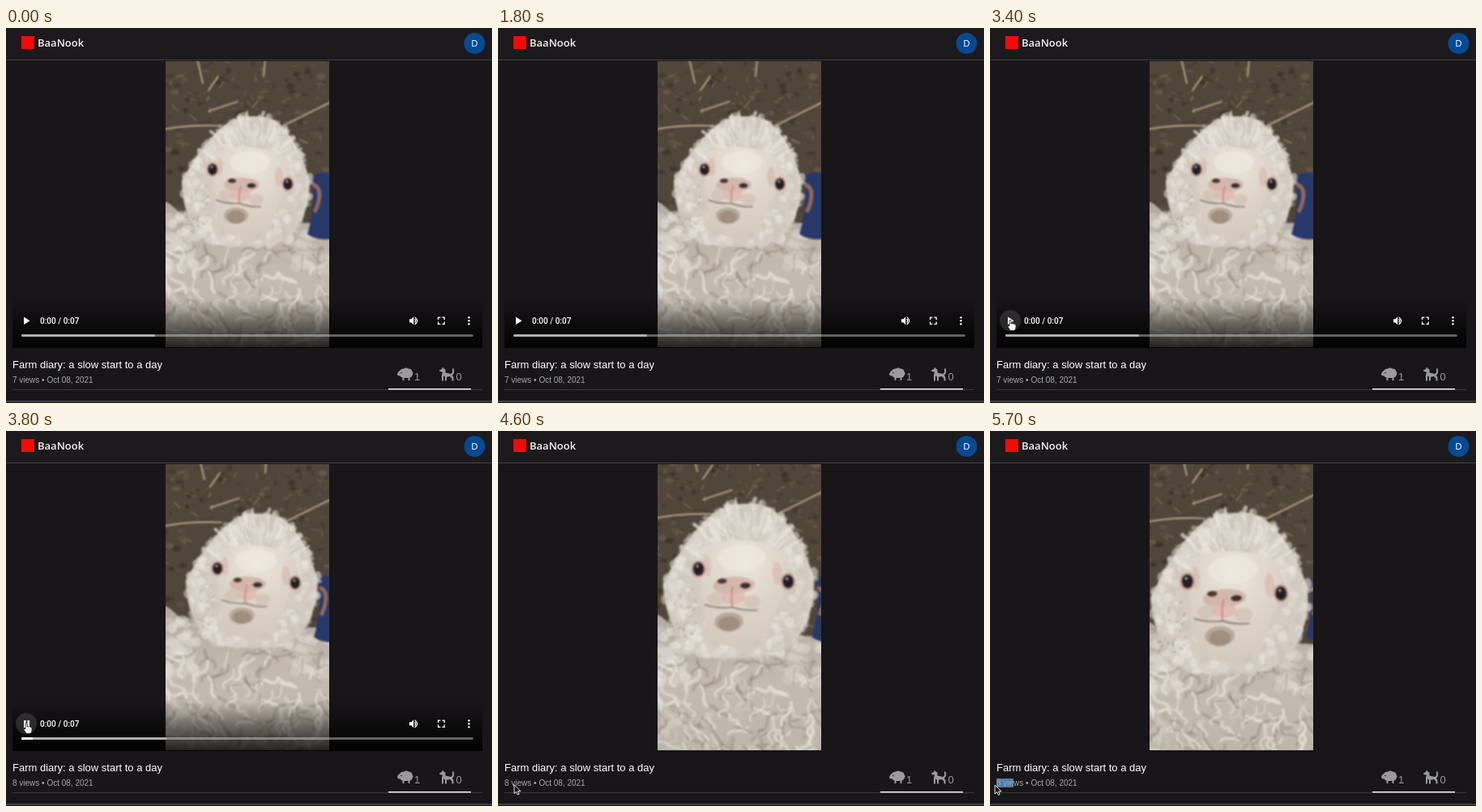
An HTML page for the animation above (5800 ms loop, 600x464 px).

```html
<!DOCTYPE html>
<html lang="en">
<head>
<meta charset="utf-8">
<title>Video page</title>
<style>
  html, body { margin: 0; width: 100%; height: 100%; overflow: hidden; background: #181618; }
  svg { display: block; width: 600px; height: 464px; font-family: "Liberation Sans", Arial, sans-serif; }
  .brand { font: 600 13px "Open Sans", Roboto, sans-serif; font-stretch: 75%; }
  .clock { font: 500 10px Roboto, sans-serif; }
  .soft { filter: blur(.8px); }
</style>
</head>
<body>
<svg viewBox="0 0 600 464">
  <defs>
    <clipPath id="screen"><rect x="197" y="41" width="202" height="354"/></clipPath>
    <linearGradient id="shade" x2="0" y2="1">
      <stop stop-opacity="0"/><stop offset=".45" stop-opacity=".4"/><stop offset="1" stop-opacity=".82"/>
    </linearGradient>
    <linearGradient id="fleece" x2="0" y2="1">
      <stop stop-color="#b3a99d"/><stop offset=".45" stop-color="#c4bbb0"/><stop offset="1" stop-color="#bcb3a8"/>
    </linearGradient>
    <radialGradient id="skin" cx=".5" cy=".2" r=".85">
      <stop stop-color="#ece6dd"/><stop offset=".6" stop-color="#dbd1c6"/><stop offset="1" stop-color="#d2c8bc"/>
    </radialGradient>
  </defs>

  <!-- page -->
  <rect width="600" height="39" fill="#1c1a1c"/>
  <rect y="39" width="600" height="1" fill="#434143"/>
  <rect x="19" y="10" width="16" height="16" fill="#f40a0a"/>
  <text class="brand" x="39" y="23" fill="#f2f2f2">BaaNook</text>
  <circle cx="578.5" cy="19" r="13" fill="#064a93"/>
  <text x="578.5" y="23" font-size="11" text-anchor="middle" fill="#fff">D</text>

  <!-- footage -->
  <g clip-path="url(#screen)">
    <rect x="197" y="41" width="202" height="354" fill="#50463a"/>
    <g id="ground" class="soft"></g>
    <g id="fleeceBody" class="soft"></g>
    <g id="strap" class="soft">
      <path d="M378 183Q390 176 403 181V261Q385 264 372 255Q382 225 378 183z" fill="#27386b"/>
      <path d="M379 194q8 2 8 12t-6 22" fill="none" stroke="#94695a" stroke-width="5"/>
    </g>
    <g id="head" class="soft"></g>
  </g>

  <!-- player controls -->
  <g id="panel" fill="#fff">
    <rect x="8" y="335" width="580" height="61" fill="url(#shade)"/>
    <circle id="hover" cx="25" cy="362" r="13" fill-opacity=".12"/>
    <path id="play" d="M22 357.5v9.5l7.5-4.75z"/>
    <path id="pause" d="M22 358h2.6v9H22zM26.4 358H29v9h-2.6z"/>
    <text class="clock" x="42" y="366">0:00 / 0:07</text>
    <path d="M498 360.3h2.2l3-3v10l-3-3H498z"/>
    <path d="M504.7 360q2 2.3 0 4.6M504.7 357.6q6 4.7 0 9.4" fill="none" stroke="#fff" stroke-width="1.2"/>
    <path d="M533.6 361v-2.8h2.8M538.4 358.2h2.8v2.8M541.2 363.6v2.8h-2.8M536.4 366.4h-2.8v-2.8" fill="none" stroke="#fff" stroke-width="1.3"/>
    <circle cx="571.5" cy="358.3" r="1.2"/><circle cx="571.5" cy="362.3" r="1.2"/><circle cx="571.5" cy="366.3" r="1.2"/>
    <rect x="19" y="379" width="558" height="3" rx="1.5" fill-opacity=".36"/>
    <rect id="buffered" x="19" y="379" height="3" rx="1.5" fill-opacity=".5"/>
    <rect id="played" x="19" y="379" height="3" rx="1.5"/>
    <circle id="knob" cx="23.5" cy="380.5" r="4.3" fill="#d4d4d4"/>
  </g>

  <!-- details -->
  <text x="8" y="421" font-size="13" fill="#fff">Farm diary: a slow start to a day</text>
  <rect id="selection" y="430" height="11" fill="#4a7ba6"/>
  <text x="8" y="439" font-size="10" fill="#a9a9a9"><tspan id="views">7</tspan> views • Oct 08, 2021</text>
  <g fill="#9b9a9c">
    <path d="M486 424q2-3 5-2.500q3-2 6 0q4 0 4.500 3.500q2 2.500 0 5q-1 2.500-3 2.500v3.500h-2V433h-5v3h-2v-3.500q-2 0-3-2.200q-3 .5-3.500-1.800q.5-3.500 3-4.500z"/>
    <circle cx="488" cy="426.500" r=".8" fill="#181618"/>
    <path d="M535 423.500l3-1.500 1-2.500 1.500 2 2 1v4q4 .5 6.500 1.500q3-1 2-5q-.5-2 1.500-2q2 6-1.500 8.500l1.500 3v4h-2v-3l-2.500-2.500-4 .8v4.700h-2v-5l-2-1v6h-2v-7l1-4-3.500-.5z"/>
    <text x="504" y="436" font-size="13">1</text>
    <text x="555.500" y="436" font-size="13">0</text>
  </g>
  <rect x="8" y="447" width="580" height="1" fill="#3a383a"/>
  <rect x="472" y="446" width="102" height="1.500" fill="#f2f2f2"/>
  <rect y="461" width="600" height="2" fill="#434143"/>

  <!-- pointers, each with its hot spot at the origin -->
  <g id="cursor">
    <path id="arrow" d="M0 0V11L2.600 8.700 4.300 12.400 6.100 11.600 4.500 8H8z" fill="#111" stroke="#fff" stroke-width=".9"/>
    <path id="hand" d="M-1 1q1-2 2 0V5q3-1 4 .3 2-.3 2 1.700v2q0 3-2 4.300H0L-3 8.500q0-1.500 2-.7z" fill="#fff" stroke="#222" stroke-width=".8"/>
    <path id="beam" d="M-2.500-5.500Q0-5.500 0-4Q0-5.500 2.500-5.500M0-4V4M-1.500 1.500h3M-2.500 5.500Q0 5.500 0 4Q0 5.500 2.500 5.500" fill="none" stroke="#f4f4f4" stroke-width="1.200"/>
  </g>
</svg>

<script>
const $ = id => document.getElementById(id);
const LOOP = 5800, STEP = 100, CLICK = 3480;

let seed = 11;
const rand = (a, b) => {
  seed = (seed * 16807) % 2147483647;
  return a + (b - a) * seed / 2147483647;
};
const pick = list => list[Math.floor(rand(0, list.length))];
const repeat = (n, make) => Array.from({ length: n }, (_, i) => make(i)).join('');
const stroke = (d, color, width, alpha = 1) =>
  `<path d="${d}" fill="none" stroke="${color}" stroke-width="${width}" stroke-linecap="round" opacity="${alpha}"/>`;
const oval = (x, y, rx, ry, color, alpha = 1) =>
  `<ellipse cx="${x}" cy="${y}" rx="${rx}" ry="${ry}" fill="${color}" opacity="${alpha}"/>`;

const WOOL = ['#ebe7e1', '#e0dbd4', '#d6d0c7', '#cbc3b9'];

function groundArt() {
  const specks = repeat(200, () => oval(rand(190, 405), rand(35, 290), rand(1, 6), rand(1, 4),
    pick(['#2f281f', '#3b3228', '#62574a', '#736756']), .55));
  const straws = repeat(110, () => stroke(
    `M${rand(190, 400)} ${rand(35, 270)}l${rand(-16, 16)} ${rand(-9, 9)}`,
    pick(['#8d7c5f', '#a3916f', '#74664f', '#352d23']), rand(.6, 1.5), .75));
  const long = ['M342 121L404 90', 'M190 126Q230 119 264 121', 'M250 103L286 91',
    'M320 38L318 60', 'M236 38L243 68', 'M262 60L250 77'];
  return specks + straws + long.map(d => stroke(d, '#c6b48c', 1.7)).join('');
}

// A lock of wool: an S-bend running from (x, y) at the given angle.
function lock(x, y, angle, length, bend) {
  const dx = Math.cos(angle) * length, dy = Math.sin(angle) * length;
  return `M${x} ${y}q${dx / 2 - dy * bend} ${dy / 2 + dx * bend} ${dx} ${dy}t${dx * .8} ${dy * .8}`;
}

function bodyArt() {
  const base = '<path d="M185 212C207 214 206 226 225 235L330 245Q375 238 410 243V410H185z" fill="url(#fleece)"/>';
  const left = repeat(50, () => oval(rand(190, 235), rand(228, 300), rand(5, 9), rand(4, 7), pick(WOOL), .5));
  const right = repeat(30, () => oval(rand(335, 405), rand(250, 300), rand(5, 9), rand(4, 7), pick(WOOL), .45));
  const locks = repeat(170, i => stroke(
    lock(rand(190, 400), rand(266, 392), rand(.2, 2.9), rand(8, 18), rand(-.7, .7)),
    i % 3 ? pick(WOOL) : '#8f8373', rand(1.5, 4.5), i % 3 ? .7 : .4));
  return base + left + right + locks;
}

// Full cheeks below, narrowing towards the crown.
function rim(angle, r) {
  const up = Math.max(0, -Math.sin(angle)), c = Math.cos(angle);
  const half = Math.sign(c) * Math.abs(c) ** .65 * (1 - .36 * up);
  return [296 + 84 * r * half + 10 * up, 190 + 86 * r * Math.sin(angle)];
}

function headArt() {
  const outline = 'M' + Array.from({ length: 60 }, (_, i) => rim(i * Math.PI / 30, .94).join(' ')).join('L') + 'z';
  const tufts = repeat(300, () => {
    const [x, y] = rim(rand(0, 2 * Math.PI), rand(.6, .96));
    return oval(x, y, rand(2, 6), rand(2, 6), pick(WOOL), .55);
  });
  const crown = repeat(90, () => {
    const a = -Math.PI * rand(.15, .85), r = rand(.5, .8), [x, y] = rim(a, r), [u, v] = rim(a, r + rand(.15, .24));
    return stroke(`M${x} ${y}Q${(x + u) / 2 + rand(-5, 5)} ${(y + v) / 2} ${u} ${v}`, pick(WOOL), rand(2, 5), .7);
  });
  const dirt = repeat(35, () => oval(rand(216, 250), rand(195, 250), .7, .7, '#6d604f', .7));
  const eye = (x, y) => oval(x, y, 7.5, 9, '#bd8a7e', .75) + oval(x, y, 5.5, 6.8, '#211d22') + oval(x - 1, y - 3, 1.4, 1.4, '#b9c2ce');
  return `<path d="${outline}" fill="#d3cbc1"/>` + tufts + crown + dirt +
    '<path d="M268 150C290 143 325 147 346 162C352 178 348 200 336 217C330 246 310 262 286 258C262 256 257 232 260 215C252 195 255 164 268 150z" fill="url(#skin)"/>' +
    oval(337, 184, 5, 12, '#d3a59a', .4) + oval(264, 172, 4, 11, '#d3a59a', .4) +
    oval(301, 166, 25, 14, '#efe9e0', .7) +
    eye(255, 175) + eye(348, 193) +
    oval(291, 194, 22, 9, '#cba99d', .7) + oval(290, 206, 12, 8, '#e0b3ab', .75) +
    oval(272, 207, 9, 7, '#c9b8a8', .5) + oval(309, 212, 9, 7, '#c9b8a8', .5) +
    oval(279, 189, 5, 2.8, '#4e3531') + oval(303, 195, 5.5, 3, '#3f2c2a') +
    stroke('M290 196Q287 205 288 216', '#bd8880', 1.5) +
    oval(284, 232, 15, 10, '#8d7967', .45) + oval(284, 234, 11, 8, '#846f5d', .45) +
    stroke('M260 213Q273 218 288 217Q301 222 314 221', '#75625a', 1.4, .85);
}

$('ground').innerHTML = groundArt();
$('fleeceBody').innerHTML = bodyArt();
$('head').innerHTML = headArt();

// time, head x, y, turn, scale, ground x, y, body y, strap x
const POSES = [
  [CLICK, 301.5, 184, 0, 1, 0, 0, 0, 0],
  [3800, 309, 179, -.4, 1.03, 2, -8, 2, 8],
  [4200, 304, 176, -2.7, 1.18, 4, -19, 10, 15],
  [5100, 301.5, 181.5, -3.3, 1.18, 2, -17, 16, 16],
  [5700, 301.5, 193.5, -3.6, 1.23, 0, -13, 22, 18]
];
// time, x, y
const TRAIL = [
  [2200, 70, 396], [2400, 42, 375], [2500, 39, 373], [2800, 34, 370], [3100, 25, 361],
  [3900, 25, 361], [4200, 21, 427], [4500, 18, 436], [4800, 24, 441], [5100, 27, 440],
  [5200, 29, 440], [5400, 9, 441], [5700, 6, 438]
];

const clamp = (v, lo = 0, hi = 1) => Math.min(hi, Math.max(lo, v));
function sample(keys, t) {
  const after = keys.findIndex(k => k[0] > t);
  const i = after < 0 ? keys.length - 1 : Math.max(1, after);
  const a = keys[i - 1], b = keys[i], f = clamp((t - a[0]) / (b[0] - a[0]));
  return a.slice(1).map((v, j) => v + (b[j + 1] - v) * f);
}
const show = (id, on) => $(id).setAttribute('visibility', on ? 'visible' : 'hidden');
const move = (id, x, y, more = '') => $(id).setAttribute('transform', `translate(${x} ${y})${more}`);

function draw(t) {
  const playing = t >= CLICK;
  const [hx, hy, turn, scale, gx, gy, by, sx] = sample(POSES, t);
  move('head', hx, hy, `rotate(${turn})scale(${scale})translate(-301.5 -184)`);
  move('ground', gx, gy);
  move('fleeceBody', 0, by);
  move('strap', sx, 0);

  const run = playing ? (t - CLICK) * .044 : 0;
  $('played').setAttribute('width', run);
  $('buffered').setAttribute('width', 165 + run);
  $('panel').setAttribute('opacity', clamp((4280 - t) / 200));
  show('play', !playing);
  show('pause', playing);
  show('hover', t >= 3100 && t < 4000);
  show('knob', t >= 2300 && t < 2900);
  $('views').textContent = playing ? 8 : 7;

  const [cx, cy] = sample(TRAIL, t);
  const from = t < 5200 ? 29 : clamp(cx, 8, 29);
  $('selection').setAttribute('x', from);
  $('selection').setAttribute('width', 29 - from);

  const hand = t >= 2300 && t < 4000, beam = t >= 4700 && t < 5500, seen = t >= 2200;
  move('cursor', cx, cy);
  show('hand', seen && hand);
  show('beam', seen && beam);
  show('arrow', seen && !hand && !beam);
}

const start = performance.now();
function tick() {
  const t = (performance.now() - start) % LOOP;
  draw(Math.floor(t / STEP) * STEP);
  requestAnimationFrame(tick);
}
tick();
</script>
</body>
</html>
```
